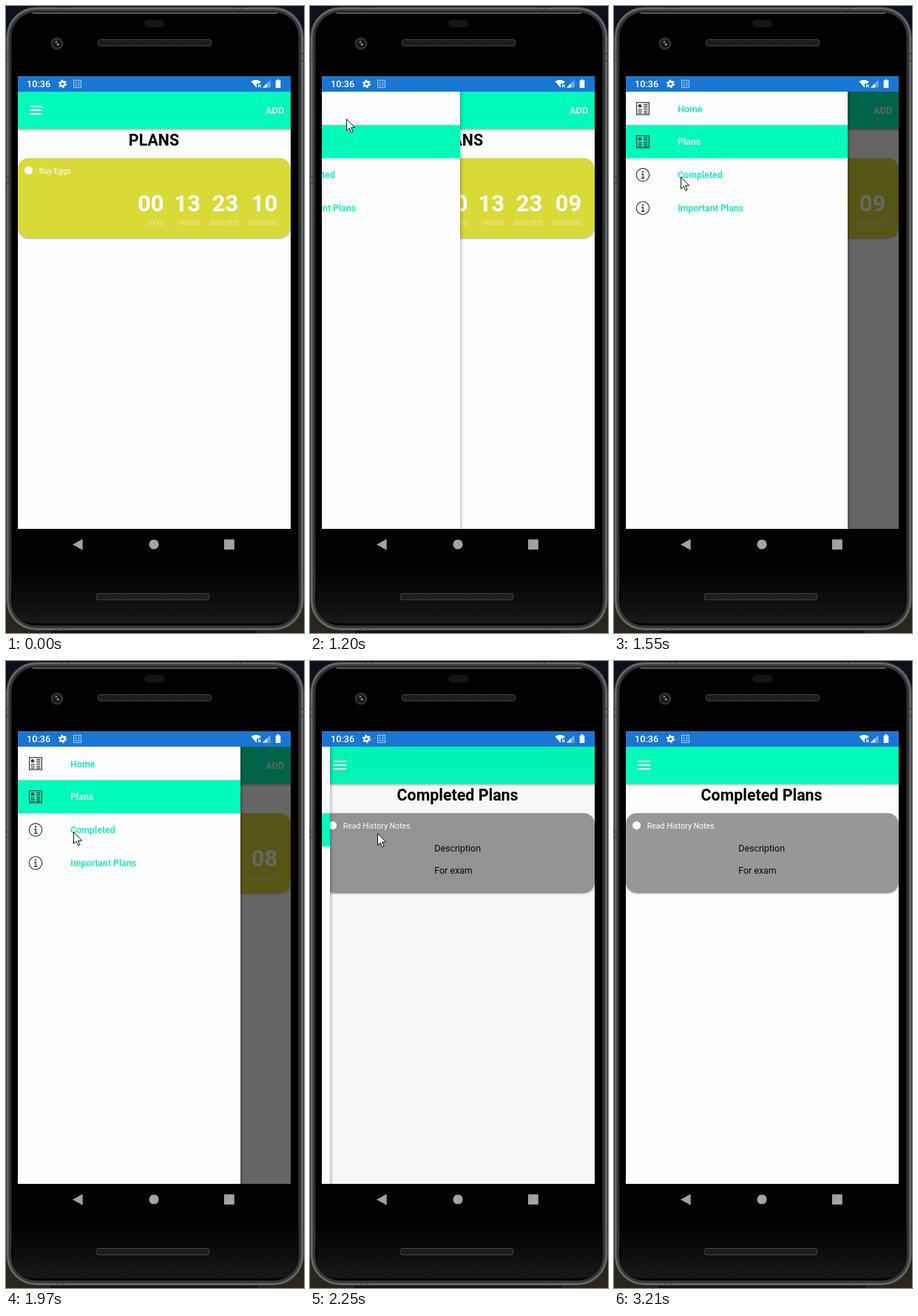
An HTML page that plays this animation: 403x849 px, repeating every 3.54 s.

```html
<!DOCTYPE html>
<html lang="en">
<head>
<meta charset="utf-8">
<title>Plans app</title>
<style>
html, body { margin: 0; width: 100%; height: 100%; overflow: hidden; background: #0b1017; }
svg { display: block; width: 403px; height: 849px; font-family: Roboto, sans-serif; }
.title { font: 700 21.4px Roboto, sans-serif; text-anchor: middle; }
.num { font: 700 31px Roboto, sans-serif; text-anchor: end; fill: #fff; }
.unit { font-size: 9px; text-anchor: end; fill: #fff; fill-opacity: .5; }
.name { font-size: 10.6px; fill: #fff; }
.note { font-size: 12.4px; fill: #0a0a0a; }
.item { font: 500 12.4px Roboto, sans-serif; fill: #00f0b4; }
.item.on { fill: #fff; }
.bar { font: 500 12.7px Roboto, sans-serif; fill: #fff; }
</style>
</head>
<body>
<svg viewBox="0 0 403 849">
  <defs>
    <linearGradient id="chin" x1="0" y1="0" x2="0" y2="1">
      <stop offset="0" stop-color="#000"/><stop offset=".6" stop-color="#0e0e0f"/><stop offset="1" stop-color="#19191a"/>
    </linearGradient>
    <linearGradient id="drop" x1="0" y1="0" x2="0" y2="1">
      <stop offset="0" stop-opacity=".3"/><stop offset="1" stop-opacity="0"/>
    </linearGradient>
    <linearGradient id="side">
      <stop offset="0" stop-opacity=".2"/><stop offset="1" stop-opacity="0"/>
    </linearGradient>
    <pattern id="mesh" width="3" height="3" patternUnits="userSpaceOnUse">
      <rect width="3" height="3" fill="#242424"/><path d="M0 3L3 0" stroke="#101010"/>
    </pattern>
    <filter id="soft" x="-5%" y="-10%" width="110%" height="125%">
      <feDropShadow dx="0" dy="1" stdDeviation="1.1" flood-opacity=".38"/>
    </filter>
    <clipPath id="screen"><rect x="16" y="116" width="369" height="592"/></clipPath>
    <g id="news" fill="none" stroke="#2f3b37" stroke-width="1.2">
      <rect x="-8.4" y="-8.2" width="16.8" height="16.4"/>
      <circle cx="-4" cy="-3.6" r="1.7" fill="#2f3b37"/>
      <path d="M-6.4 1.2H-1.2M-6.4 3.6H-1.2M-6.4 6H-1.2M1.2 -5.6H6.4M1.2 -3.2H6.4M1.2 -.8H6.4M1.2 1.6H6.4M1.2 4H6.4M1.2 6.3H6.4"/>
    </g>
    <g id="info" fill="none" stroke="#3a5048">
      <circle r="8.7" stroke-width="1.3"/>
      <path d="M-2 -1.2H.3V4.6M-2.2 4.6H2.4" stroke-width="1.5"/>
      <circle cx="0" cy="-4.2" r="1.2" fill="#3a5048" stroke="none"/>
    </g>
  </defs>

  <!-- phone body -->
  <rect width="403" height="849" fill="#0b121d"/>
  <path d="M0 70H4V230H0ZM400 70H403V220H400Z" fill="#85878a"/>
  <path d="M0 240H3V800H0ZM400 350H403V620H400Z" fill="#303134"/>
  <path d="M0 800H60V849H0ZM400 622H403V849H340V800Z" fill="#2b241a"/>
  <g id="rim"></g>
  <path d="M0 65H5M0 74H5M398 65H403M398 74H403M0 231H5M0 239H5M75 1V4M83 1V4M308 1V4M317 1V4M70 843V847M78 843V847M320 843V847" stroke="#2c2d2f"/>
  <path d="M9 760H394V804Q394 836 362 836H41Q9 836 9 804Z" fill="url(#chin)"/>
  <path d="M36 9.7H367" stroke="#a0a2a4"/>
  <rect x="187" y="18.500" width="27" height="10.500" rx="5" fill="#151516"/>
  <circle cx="69" cy="51" r="8.500" fill="#2b2d2f"/>
  <circle cx="69" cy="51" r="5.200" fill="#10151b"/>
  <circle cx="68" cy="48.800" r="1.700" fill="#5d7183"/>
  <circle cx="70.300" cy="52" r="1.200" fill="#b4c4d2"/>
  <rect x="124.500" y="45.500" width="153" height="8.500" rx="3" fill="url(#mesh)" stroke="#484848"/>
  <rect x="122" y="795.500" width="153" height="8.500" rx="3" fill="url(#mesh)" stroke="#484848"/>
  <g fill="#a2a2a2">
    <path d="M103.700 721.800V736.800L90 729.300Z"/>
    <circle cx="200" cy="729" r="6.600"/>
    <rect x="295" y="722.300" width="13.800" height="13.800" rx=".8"/>
  </g>

  <!-- status bar -->
  <rect x="16" y="95" width="369" height="21" fill="#1976d2"/>
  <text class="bar" x="28" y="110.300">10:36</text>
  <g fill="none" stroke="#fff">
    <circle cx="76.500" cy="105.500" r="3" stroke-width="2.400"/>
    <circle cx="76.500" cy="105.500" r="4.900" stroke-width="1.600" stroke-dasharray="2.560 2.570"/>
    <path d="M91.500 100.500H101.500V110.500H91.500ZM93 103H95.500M93 105.500H95.500M93 108H100M97 103H100M97 105.500H100" stroke-width=".9" opacity=".7"/>
  </g>
  <path d="M331.500 102.300Q338 97.500 344.800 102.300L342.600 105H339V109.400L338.300 110.300Z" fill="#fff"/>
  <path d="M340.700 106.200L344.700 110.200M344.700 106.200L340.700 110.200" stroke="#fff" stroke-width="1.200"/>
  <path d="M357.500 100V110.500H347Z" fill="#fff" opacity=".4"/>
  <path d="M352.700 104.800V110.500H347Z" fill="#fff"/>
  <path d="M366.500 99.500H369.500V100.700H371.300V111H364.700V100.700H366.500Z" fill="#fff"/>

  <g clip-path="url(#screen)">
    <rect x="16" y="116" width="369" height="592" fill="#fefefe"/>
    <rect x="16" y="166" width="369" height="4" fill="url(#drop)"/>
    <rect x="16" y="116" width="369" height="50.300" fill="#00fbba"/>
    <path d="M32 136H49M32 141H49M32 146H49" stroke="#fff" stroke-width="2"/>

    <g id="plans">
      <text class="bar" x="376.200" y="146" text-anchor="end">ADD</text>
      <text class="title" x="200" y="189.300">PLANS</text>
      <rect x="16" y="206" width="369" height="108" rx="15" fill="#d9d937" filter="url(#soft)"/>
      <circle cx="30.500" cy="222.600" r="5.600" fill="#fff"/>
      <text class="name" x="44.700" y="226.700">Buy Eggs</text>
      <text class="num" x="213.500" y="277.800">00</text>
      <text class="num" x="263" y="277.800">13</text>
      <text class="num" x="314.300" y="277.800">23</text>
      <text class="num" x="367.300" y="277.800" id="secs">10</text>
      <text class="unit" x="213.500" y="297">DAYS</text>
      <text class="unit" x="262.800" y="297">HOURS</text>
      <text class="unit" x="314.300" y="297">MINUTES</text>
      <text class="unit" x="367.300" y="297">SECONDS</text>
    </g>

    <g id="done">
      <text class="title" x="199.600" y="189.300">Completed Plans</text>
      <rect x="16" y="206" width="369" height="108" rx="15" fill="#979797" filter="url(#soft)"/>
      <circle cx="30.500" cy="222.600" r="5.600" fill="#fff"/>
      <text class="name" x="44.700" y="226.700">Read History Notes</text>
      <text class="note" x="168.300" y="257.500">Description</text>
      <text class="note" x="168.300" y="287.700">For exam</text>
    </g>

    <rect id="scrim" x="16" y="116" width="369" height="592"/>
    <g id="drawer">
      <rect x="317" y="116" width="5" height="592" fill="url(#side)"/>
      <rect x="16" y="116" width="301" height="592" fill="#fefefe"/>
      <rect id="pick" x="16" width="301" height="44.900" fill="#00fbba"/>
      <g id="items"></g>
    </g>
  </g>

  <path id="cursor" d="M.5 .5V16.400L4.200 13L6.700 18.900L9.100 17.900L6.600 12.200H11.600Z" fill="#fff" stroke="#111" stroke-width="1" stroke-linejoin="round"/>
</svg>
<script>
const LOOP = 3540, WIDTH = 301, SETTLE = 555;
const OPEN = 1102, SHOWN = 1200, CLOSE = 1983, SWITCH = 2040;
const $ = id => document.getElementById(id);

// Metal rim: nested outlines from the outer edge inwards, by grey level
$('rim').innerHTML = [52, 100, 112, 82, 50, 62, 40, 20, 0].map((v, d) =>
  `<rect x="${d}" y="${d + 1}" width="${403 - 2 * d}" height="${845 - 2 * d}" rx="${41 - d}" fill="rgb(${v},${v},${v + 1})"/>`
).join('');

const rowTop = i => 116.4 + i * 44.9;
$('items').innerHTML = ['Home', 'Plans', 'Completed', 'Important Plans'].map((label, i) => {
  const y = rowTop(i) + 22.5;
  return `<use href="#${i < 2 ? 'news' : 'info'}" x="40" y="${y}"/>` +
    `<text class="item" x="87.2" y="${y + 4.6}">${label}</text>`;
}).join('');
const labels = document.querySelectorAll('.item');

const ticks = [0, 190, 740, 1200, 1780, 1840, 1970, 2380, 2850, 2920, 3210];
function snap(t) {
  const base = ticks.filter(s => s <= t).pop();
  return base + Math.floor((t - base) / 70) * 70;
}

const clamp = v => Math.min(1, Math.max(0, v));
const remain = (t, start) => (1 - clamp((t - start) / SETTLE)) ** 5;
function openness(t) {
  return t < CLOSE ? 1 - remain(t, OPEN) : remain(t, CLOSE);
}

// time, x, y of the pointer tip
const path = [
  [190, 354, 728], [680, 42, 130], [1090, 42, 134], [1200, 49, 152.500],
  [1340, 77, 225], [1480, 90, 231], [1970, 91, 231], [2110, 91, 233],
  [2380, 91, 233], [2850, 336, 672], [3210, 354, 852]
];
function pointer(t) {
  const i = path.findIndex(p => p[0] > t);
  if (i < 1) return null;
  const [a, b] = [path[i - 1], path[i]];
  let k = (t - a[0]) / (b[0] - a[0]);
  if (b[0] - a[0] > 450) k = k * k * (3 - 2 * k);
  return [a[1] + (b[1] - a[1]) * k, a[2] + (b[2] - a[2]) * k];
}

const show = (el, on) => el.setAttribute('visibility', on ? 'visible' : 'hidden');

function draw(time) {
  const t = snap(time);
  const width = t < SHOWN ? 0 : Math.floor(openness(t) * WIDTH);
  const done = t >= SWITCH;
  const picked = done ? 2 : 1;

  show($('plans'), !done);
  show($('done'), done);
  $('secs').textContent = t < 810 ? '10' : t < 1780 ? '09' : '08';

  show($('drawer'), width > 0);
  $('drawer').setAttribute('transform', `translate(${width - WIDTH} 0)`);
  $('scrim').setAttribute('opacity', t <= SHOWN ? 0 : .6 * openness(t - 8));
  $('pick').setAttribute('y', rowTop(picked));
  labels.forEach((el, i) => el.classList.toggle('on', i === picked));

  const at = pointer(t);
  show($('cursor'), at);
  if (at) $('cursor').setAttribute('transform', `translate(${at[0]} ${at[1]})`);
}

const begin = performance.now();
function tick() {
  draw((performance.now() - begin) % LOOP);
  requestAnimationFrame(tick);
}
tick();
</script>
</body>
</html>
```
